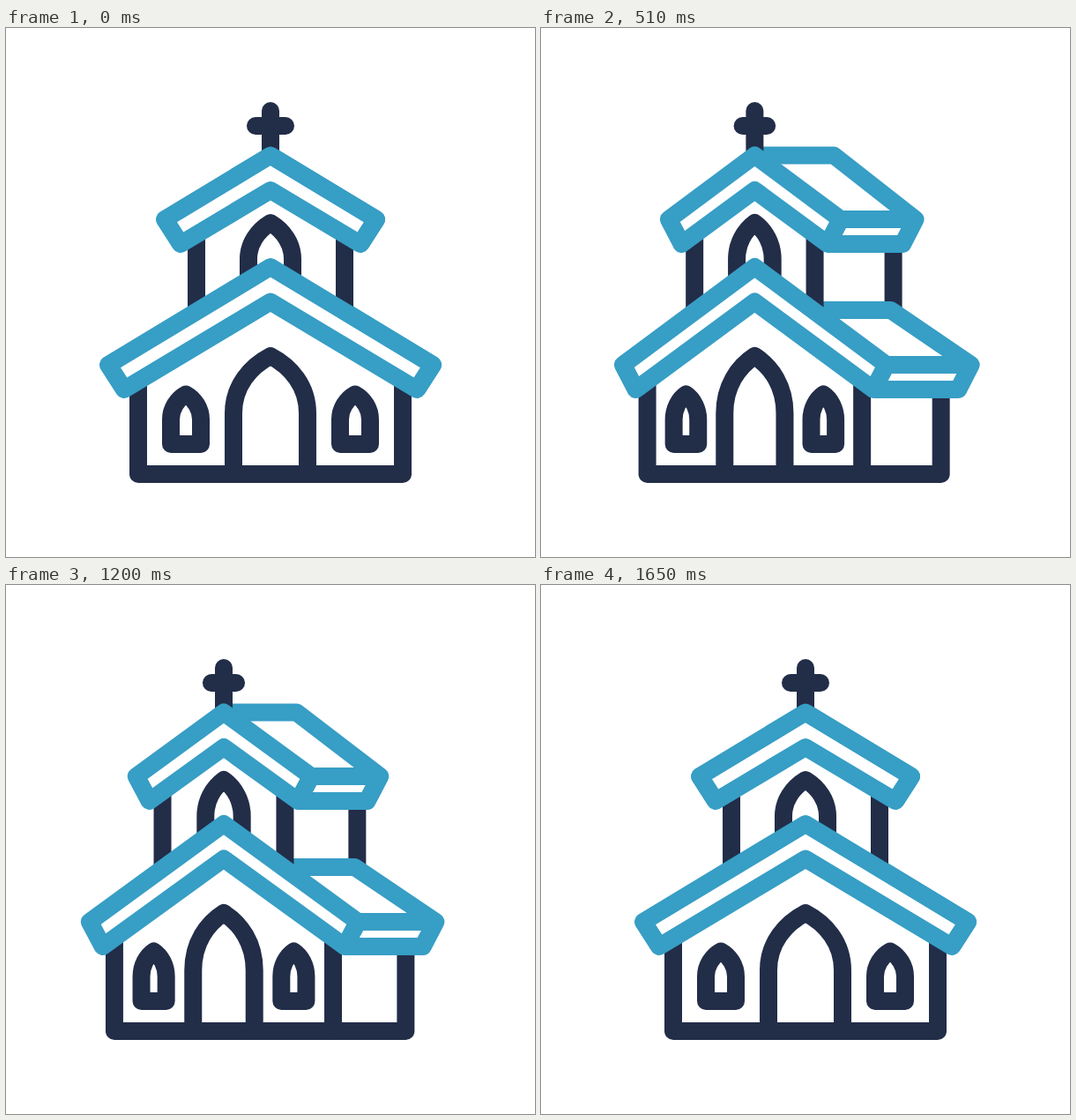
These frames come from a looping animation (600x600 px, 1.95 s). An HTML page:

```html
<!DOCTYPE html>
<html lang="en">
<head>
<meta charset="utf-8">
<title>Turning church</title>
<style>
  html, body { margin: 0; width: 100%; height: 100%; overflow: hidden; background: #fff; }
  svg { display: block; width: 100%; height: 100%; }
  path { fill: none; stroke-width: 20; stroke-linejoin: round; }
  .wall { stroke: #222d48; }
  .roof { stroke: #379ec5; }
  .round { stroke-linecap: round; }
</style>
</head>
<body>
<svg viewBox="0 0 600 600"></svg>
<script>
const LOOP = 1950, TURN = 600, OPEN = 150, CLOSE = 1050;

// "x y" lies on the front face; "a:b y" travels from a (shut) to b (open).
const shapes = [
  // side walls
  ['wall', 'M384:401 245 L384:401 320 M450 506 L450:454 506 L450:454 408'],
  // side roofs
  ['roof', `M300 144.5 L300:335 144.5 L420:425 217 L402:411 245 L402 245 M420 217 L420:425 217
            M382 320 L382:398 320 L484:488 382 L466:474 410 L466 410 M484 382 L484:488 382`],
  // cross
  ['wall round', 'M300 94 L300 142 M283 111 L317 111'],
  // front walls, door and windows
  ['wall', `M216 236 L216 322 M384 236 L384 322
            M275 282 L275 262 C275 245 285 230 300 221 C315 230 325 245 325 262 L325 282
            M150 402 L150 506 L450 506 L450 402
            M258 506 L258 437 C258 406 277 384 300 372 C323 384 342 406 342 437 L342 506
            ${sideWindow(204)} ${sideWindow(396)}`],
  // front roofs
  ['roof', `M300 144.5 L420 217 L402 245 L300 184 L198 245 L180 217 Z
            M300 271 L484 382 L466 410 L300 310.5 L134 410 L116 382 Z`]
];

function sideWindow(x) {
  const l = x - 17, r = x + 17;
  return `M${l} 472 L${l} 444 C${l} 432 ${x - 10} 421 ${x} 415.5
          C${x + 10} 421 ${r} 432 ${r} 444 L${r} 472 Z`;
}

// Cubic bezier (.56, 0, 0, 1), solved by bisection
function ease(x) {
  if (x <= 0) return 0;
  if (x >= 1) return 1;
  let lo = 0, hi = 1, s;
  for (let i = 0; i < 30; i++) {
    s = (lo + hi) / 2;
    if (3 * (1 - s) ** 2 * s * 0.56 + s ** 3 < x) lo = s; else hi = s;
  }
  return s * s * (3 - 2 * s);
}

function place(d, q) {
  const middle = 300 - 62.8 * q, squeeze = 1 - 0.205 * q;
  return d.replace(/([\d.]+)(?::([\d.]+))? ([\d.]+)/g, (_, a, b, y) => {
    const x = b ? +a + (b - a) * q : middle + (a - 300) * squeeze;
    return `${x.toFixed(3)} ${y}`;
  });
}

const svg = document.querySelector('svg');
const paths = shapes.map(([kind, d]) => {
  const el = document.createElementNS('http://www.w3.org/2000/svg', 'path');
  el.setAttribute('class', kind);
  svg.append(el);
  return [el, d];
});

function draw(t) {
  const q = ease((t - OPEN) / TURN) - ease((t - CLOSE) / TURN);
  for (const [el, d] of paths) el.setAttribute('d', place(d, q));
}

const start = performance.now();
function tick() {
  draw((performance.now() - start) % LOOP);
  requestAnimationFrame(tick);
}
tick();
</script>
</body>
</html>
```
